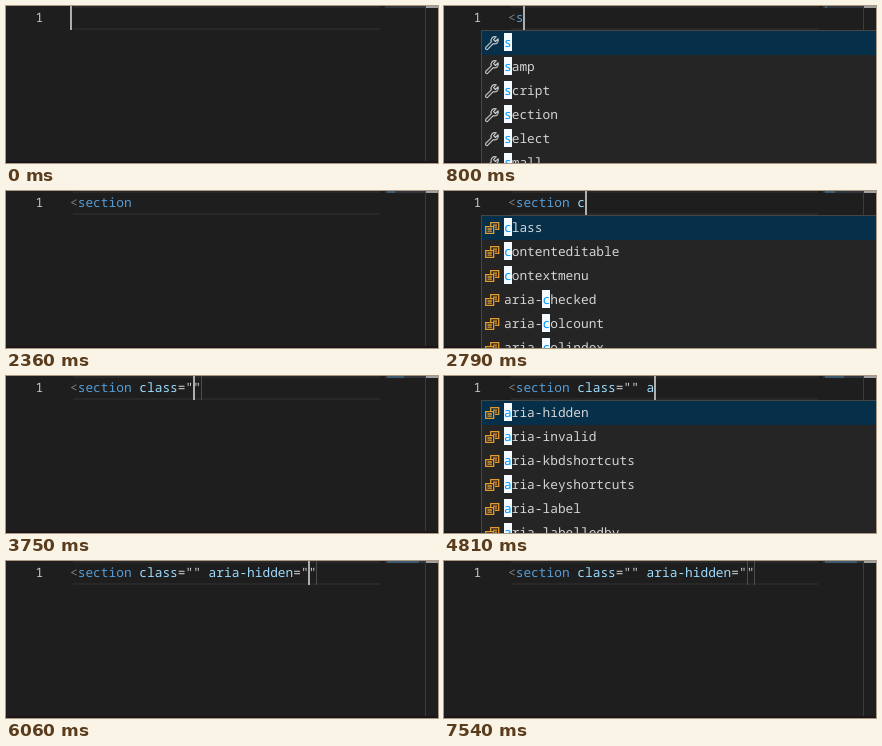
An HTML page that plays this animation: 432x157 px, repeating every 8090 ms.

```html
<!DOCTYPE html>
<html lang="en">
<head>
<meta charset="utf-8">
<title>Tag and attribute completion</title>
<style>
html, body { margin: 0; width: 100%; height: 100%; overflow: hidden; background: #1e1e1e; }
#stage {
  position: relative; width: 432px; height: 157px; overflow: hidden; background: #1e1e1e;
  font: 12.83px/24px "Noto Sans Mono", "DejaVu Sans Mono", monospace;
  text-rendering: geometricPrecision; font-variant-ligatures: none; color: #d4d4d4;
}
#stage div, #stage svg { position: absolute; }
.text { white-space: pre; height: 24px; }
.line { left: 67px; width: 307px; height: 2px; background: #282828; }
#num { left: 29.5px; top: -1px; color: #c6c6c6; }
#code { left: 64px; top: -1px; }
#caret { top: 0; width: 2px; height: 24px; background: #aeafad; }
.stop { top: 0; width: 1px; height: 24px; background: #4c4c4c; }
#slider { left: 379px; top: 0; width: 40px; height: 2px; background: #30363c; }
#map { left: 381px; top: 0; height: 2px; background: #3d5a70; }
#rule { left: 419px; top: 0; width: 1px; height: 157px; background: #3b3b3b; }
#mark { left: 420px; top: 0; width: 12px; height: 2px; background: #a0a0a0; }
#foot { left: 0; top: 155px; width: 432px; height: 2px; background: #1b1418; }
#popup { left: 37px; top: 24px; width: 420px; background: #252526; border: 1px solid #454545; box-sizing: border-box; }
.row { left: 0; width: 100%; height: 24px; }
.row:first-child { background: #062f4a; }
.row .text { left: 22px; top: -1px; }
.row svg { left: 2px; top: 4px; width: 16px; height: 16px; fill: none; }
.row b { font-weight: 400; color: #0097fb; background: #f4faff; }
.lt { color: #808080; } .tag { color: #569cd6; } .attr { color: #9cdcfe; } .str { color: #c8ccd0; }
</style>
</head>
<body>
<div id="stage">
  <div class="line" style="top:0"></div>
  <div class="line" style="top:22px"></div>
  <div id="slider"></div><div id="map"></div><div id="rule"></div><div id="mark"></div><div id="foot"></div>
  <div id="num" class="text">1</div>
  <div id="code" class="text"></div>
  <div id="stopA" class="stop"></div><div id="stopB" class="stop"></div>
  <div id="caret"></div>
  <div id="popup"></div>
</div>
<script>
const LOOP = 8090, CHAR = 7.7, LEFT = 64, ROW = 24;
const $ = id => document.getElementById(id);

const ICONS = {
  tag: `<svg viewBox="0 0 16 16" stroke="#c5c5c5" stroke-width="1.2" stroke-linejoin="round">
    <path d="M1.9 12.2 7.3 6.8C6.4 4 8.6.9 12.2 1.8L9.5 4.6l1.9 1.9 2.8-2.7c.9 3.6-2.2 5.8-5 4.9l-5.4 5.4c-1.3 1.2-3.1-.6-1.9-1.9z"/></svg>`,
  attr: `<svg viewBox="0 0 16 16" stroke="#e59a2c" stroke-width="1.3">
    <path d="M6.7 6V2.7h8v6.6H11M9 5.2h4M11 7.2h2M1.7 6.7h8v6.6h-8zM3.5 9h4.4M3.5 11.2h4.4"/></svg>`
};

// Square brackets enclose the matched letters.
const aria = n => ["hidden", "invalid", "kbdshortcuts", "keyshortcuts", "label", "labelledby"]
  .map(s => `[${"aria".slice(0, n)}]${"aria".slice(n)}-${s}`);
const LISTS = {
  all: ["tag", "a", "abbr", "address", "area", "article", "aside"],
  s: ["tag", "[s]", "[s]amp", "[s]cript", "[s]ection", "[s]elect", "[s]mall"],
  se: ["tag", "[se]ction", "[se]lect", "[s]ourc[e]", "[s]tyl[e]"],
  sec: ["tag", "[sec]tion", "[se]le[c]t", "[s]our[ce]"],
  c: ["attr", "[c]lass", "[c]ontenteditable", "[c]ontextmenu", "aria-[c]hecked", "aria-[c]olcount", "aria-[c]olindex"],
  cl: ["attr", "[cl]ass", "[c]ontenteditab[l]e", "aria-[c]o[l]count", "aria-[c]o[l]index", "aria-[c]o[l]span", "aria-[c]ontro[l]s"],
  a: ["attr", ...aria(1)],
  ar: ["attr", ...aria(2)],
  ari: ["attr", ...aria(3)]
};

// time, code with | at the caret, list, caret hidden, tab stops shown
const CLS = '<section class=""', DONE = `${CLS} aria-hidden="|"`;
const STEPS = [
  [0, "|"],
  [500, "<|", "all"],
  [800, "<s|", "s"],
  [1000, "<se|", "se"],
  [1310, "<sec|", "sec"],
  [1790, "<sec|", "sec", 1],
  [1860, "<section|"],
  [2360, "<section|", "", 1],
  [2490, "<section |"],
  [2790, "<section c|", "c"],
  [3040, "<section cl|", "cl"],
  [3490, "<section cl|", "cl", 1],
  [3750, '<section class="|"', "", 0, 1],
  [4180, CLS + "|"],
  [4560, CLS + " |"],
  [4810, CLS + " a|", "a"],
  [5060, CLS + " ar|", "ar"],
  [5180, CLS + " ari|", "ari"],
  [5680, CLS + " ari|", "ari", 1],
  [6060, DONE, "", 0, 1],
  [6550, DONE, "", 1, 1],
  [7030, DONE, "", 0, 1],
  [7540, DONE, "", 1, 1]
];

const span = (cls, s) => `<span class="${cls}">${s.replace("<", "&lt;")}</span>`;

function colour(code) {
  return code.replace(/(<)(\w*)|"+|[\w-]+/g, (m, lt, tag) =>
    lt ? span("lt", lt) + span("tag", tag) : span(m[0] === '"' ? "str" : "attr", m));
}

function rows([icon, ...items]) {
  return items.map((item, i) => {
    const label = item.replace(/\[/g, "<b>").replace(/\]/g, "</b>");
    return `<div class="row" style="top:${i * ROW}px">${ICONS[icon]}<div class="text">${label}</div></div>`;
  }).join("");
}

function show([, text, list, hidden, stops]) {
  const col = text.indexOf("|"), code = text.replace("|", "");
  const x = LEFT + col * CHAR;
  $("code").innerHTML = colour(code);
  $("map").style.width = code.length + "px";
  $("caret").style.left = Math.floor(x) + "px";
  $("caret").style.display = hidden ? "none" : "";
  $("stopA").style.left = Math.round(x) + "px";
  $("stopB").style.left = Math.round(x + CHAR) + "px";
  $("stopA").style.display = $("stopB").style.display = stops ? "" : "none";
  $("popup").style.display = list ? "" : "none";
  if (list) {
    $("popup").innerHTML = rows(LISTS[list]);
    $("popup").style.height = (LISTS[list].length - 1) * ROW + 4 + "px";
  }
}

const start = performance.now();
let current;
function tick(now) {
  const t = Math.max(0, now - start) % LOOP;
  const step = STEPS.filter(s => s[0] <= t).pop();
  if (step !== current) show(current = step);
  requestAnimationFrame(tick);
}
tick(start);
</script>
</body>
</html>
```
